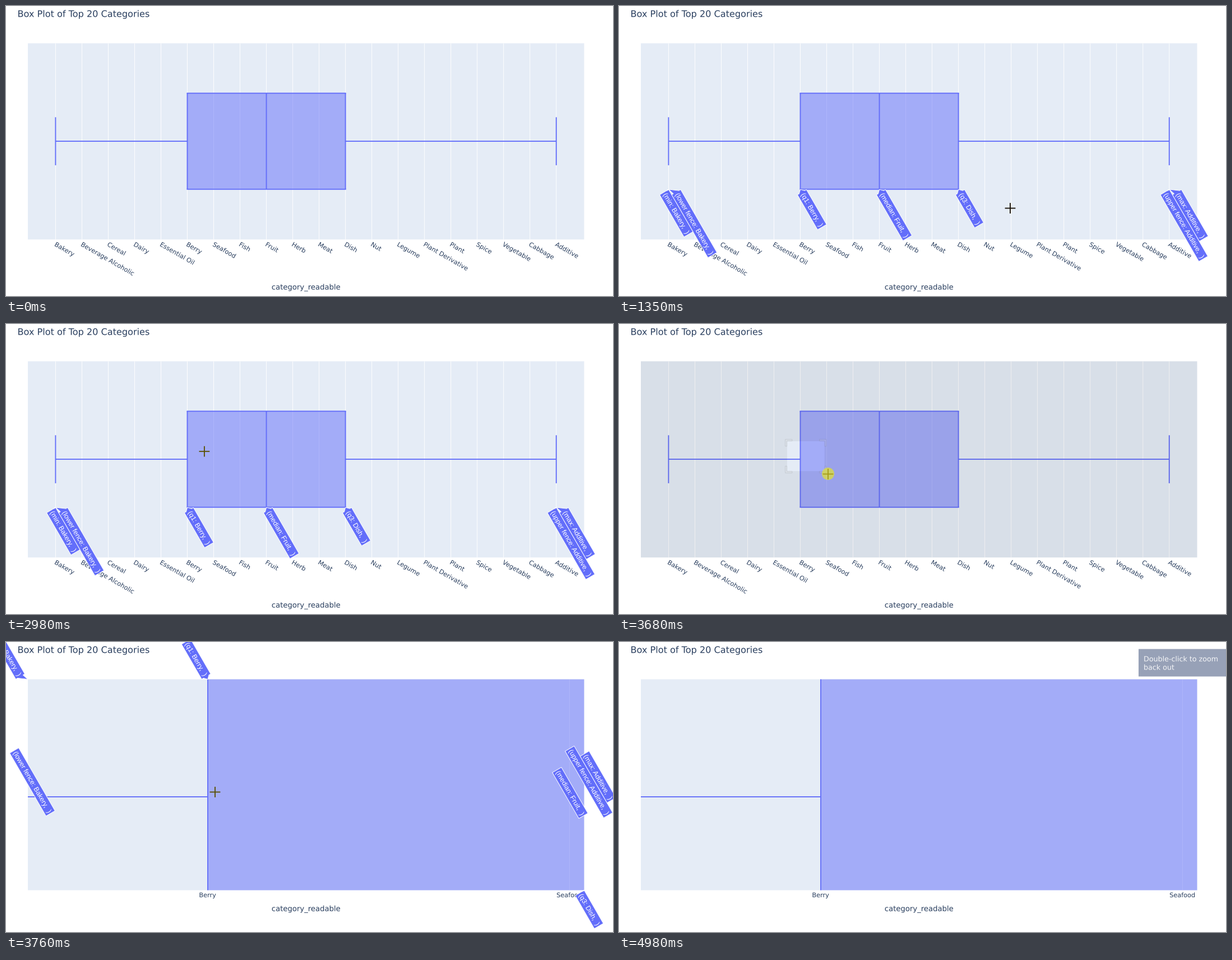
Write a matplotlib script that moves like this. It is 1083 px wide and 517 px high and loops after 5.21 s.

```python
from itertools import count

import numpy as np
import matplotlib.pyplot as plt
from matplotlib.animation import FuncAnimation
from matplotlib.patches import Circle, PathPatch, Polygon, Rectangle
from matplotlib.path import Path
from matplotlib.textpath import TextPath
from matplotlib.transforms import Affine2D

W, H = 1083, 517
LOOP, STEP = 5210, 10
INK, BLUE, PANEL = "#2a3f5f", "#636efa", "#e5ecf6"
LEFT, RIGHT, TOP = 39, 1031.5, 66.5
BOTTOM, ZOOM_BOTTOM = 416.2, 442.5
GRID0, GAP = 88.4, 47.02
PRESS, SHADE, RELEASE, ZOOM = 3370, 3605, 3730, 3760

CATEGORIES = ["Bakery", "Beverage Alcoholic", "Cereal", "Dairy",
              "Essential Oil", "Berry", "Seafood", "Fish", "Fruit", "Herb",
              "Meat", "Dish", "Nut", "Legume", "Plant Derivative", "Plant",
              "Spice", "Vegetable", "Cabbage", "Additive"]

plt.rcParams["path.snap"] = False
# At 72 dpi one point equals one pixel.
fig = plt.figure(figsize=(W / 72, H / 72), dpi=72, facecolor="white")
ax = fig.add_axes([0, 0, 1, 1])
ax.set_xlim(0, W)
ax.set_ylim(H, 0)
ax.axis("off")
layer = count(1)


def put(artist):
    artist.set_zorder(next(layer))
    ax.add_artist(artist)
    return artist


def rect(x0, y0, x1, y1, color, **kw):
    return put(Rectangle((x0, y0), x1 - x0, y1 - y0, fc=color, lw=0, **kw))


def lines(segments, color, width):
    pts = [p for a, b in segments for p in (a, b, (np.nan, np.nan))]
    x, y = zip(*pts)
    return put(plt.Line2D(x, y, color=color, lw=width,
                          solid_capstyle="butt"))


def glyphs(s, size, font="DejaVu Sans"):
    return TextPath((0, 0), s, size=size, prop=font)


def write(path, x, y, color=INK, turn=0, centre=False):
    """Place glyphs with the baseline at (x, y), turned clockwise."""
    box = path.get_extents()
    move = Affine2D().translate(-(box.x0 + box.x1) / 2 if centre else 0, 0)
    move.scale(1, -1).rotate_deg(turn).translate(x, y)
    return put(PathPatch(move.transform_path(path), fc=color, lw=0))


def text(x, y, s, size, color=INK, **kw):
    return write(glyphs(s, size), x, y, color, **kw)


def slot(i):
    return GRID0 + GAP * i


def compound(polygons):
    return Path.make_compound_path(
        *[Path(list(p) + [p[0]], closed=True) for p in polygons])


def box_points(x0, y0, x1, y1):
    return [(x0, y0), (x1, y0), (x1, y1), (x0, y1)]


def wide_plot():
    q1, med, q3 = slot(5), slot(8), slot(11)
    lo, hi = slot(0), slot(19)
    top, mid, low = 155.5, 241.1, 326.7
    art = [rect(LEFT, TOP, RIGHT, BOTTOM, PANEL),
           lines([((slot(i), TOP), (slot(i), BOTTOM)) for i in range(20)],
                 "white", 0.94),
           rect(q1, top, q3, low, BLUE, alpha=0.5),
           lines([((q1 - 0.9, top), (q3 + 0.9, top)),
                  ((q1 - 0.9, low), (q3 + 0.9, low)),
                  ((q1, top), (q1, low)), ((q3, top), (q3, low)),
                  ((med, top), (med, low)),
                  ((lo, mid), (q1, mid)), ((q3, mid), (hi, mid)),
                  ((lo, 198.3), (lo, 283.9)), ((hi, 198.3), (hi, 283.9))],
                 BLUE, 1.88),
           text(535.3, 505.5, "category_readable", 13.2, centre=True)]
    art += [text(slot(i) - 2.8, 427.2, name, 11.28, turn=30)
            for i, name in enumerate(CATEGORIES)]
    return art


def zoomed_plot():
    return [rect(LEFT, TOP, RIGHT, ZOOM_BOTTOM, PANEL),
            lines([((1005.3, TOP), (1005.3, ZOOM_BOTTOM))], "white", 0.94),
            rect(360, TOP, RIGHT, ZOOM_BOTTOM, BLUE, alpha=0.5),
            lines([((360, TOP), (360, ZOOM_BOTTOM)),
                   ((LEFT, 276), (360, 276))], BLUE, 1.88),
            text(360, 455, "Berry", 11.28, centre=True),
            text(1005, 455, "Seafood", 11.28, centre=True),
            text(535.3, 479.8, "category_readable", 13.2, centre=True)]


ALONG = np.array([0.5, 0.866])
ACROSS = np.array([-0.866, 0.5])


def hover(label, x, y, shift=0, side=1):
    """Tilted label; side 1 hangs below the point, -1 above, 0 is centred."""
    path = glyphs(f"({label},  )", 12.2, "Liberation Sans")
    full, half, tip = path.get_extents().width + 6.6, 9.3, 5.64
    if side:
        s, k = shift * 0.5, -shift * 0.866
        a, b = side * tip + s, side * (tip + full) + s
        shape = [(0, 0), (a, k + tip), (a, k + half), (b, k + half),
                 (b, k - half), (a, k - half), (a, k - tip)]
        start = min(a, b)
    else:
        k, start = 0, -full / 2
        shape = box_points(start, -half, -start, half)
    origin = np.array([x, y])
    patch = put(Polygon([origin + p * ALONG + q * ACROSS for p, q in shape],
                        fc=BLUE, ec="white", lw=0.94, joinstyle="miter"))
    base = origin + (start + 2.8) * ALONG + (k + 4.2) * ACROSS
    return [patch, write(path, *base, "white", turn=60)]


def show(artists, on):
    for a in artists:
        a.set_visible(on)


wide = wide_plot()
zoomed = zoomed_plot()
title = text(20.5, 19.5, "Box Plot of Top 20 Categories", 16.1)

D = 10.7
wide_hover = (hover("lower fence: Bakery", slot(0), 327, D)
              + hover("min: Bakery", slot(0), 327, -D)
              + hover("q1: Berry", slot(5), 327)
              + hover("median: Fruit", slot(8), 327)
              + hover("q3: Dish", slot(11), 327)
              + hover("max: Additive", slot(19), 327, D)
              + hover("upper fence: Additive", slot(19), 327, -D))
zoom_hover = (hover("min: Bakery", LEFT, TOP, -D, -1)
              + hover("lower fence: Bakery", 47, 249.5, side=0)
              + hover("q1: Berry", 360, TOP, 0, -1)
              + hover("median: Fruit", 1006.5, 269, side=0)
              + hover("max: Additive", 1056.3, 240.6, side=0)
              + hover("upper fence: Additive", 1040, 249.5, side=0)
              + hover("q3: Dish", RIGHT, ZOOM_BOTTOM, -D))

notice = [rect(927, 12.5, W, 61.5, "#8c97af"),
          text(936, 34.5, "Double-click to zoom", 12.67, "white"),
          text(936, 49.5, "back out", 12.67, "white")]

blank = Path([(0, 0), (0, 0)])
shade = put(PathPatch(blank, fc="black", lw=0))
corners = put(PathPatch(blank, fc="#eeeeee", ec="#444444", lw=0.94))
halo = put(Circle((0, 0), 11, fc="#f4f400", alpha=0.56, lw=0))
cross = lines([((0, 0), (1, 1))], "black", 1.9)
ARROW = np.array([(0, 0), (0, 15.5), (3.6, 12.2), (6, 17.2), (8.2, 16.2),
                  (5.9, 11.3), (10.8, 11.3)])
arrow = put(Polygon(ARROW, fc="white", ec="black", lw=0.9))

# start ms, end ms, from, to
MOVES = [(410, 920, (987, 513), (863, 423)),
         (950, 1350, (858, 412), (698, 360.5)),
         (1620, 2140, (698, 360.5), (449, 271)),
         (2160, 2500, (449, 271), (393.5, 240)),
         (2820, 3180, (393.5, 240), (301, 210)),
         (3530, 3680, (301, 210), (373, 267.5)),
         (4000, 4240, (373, 267.5), (683, 304)),
         (4520, 4600, (683, 304), (1063, 495)),
         (4860, 4980, (1063, 495), (1087, 521))]


def glide(u):
    return 0.4 * u + 0.6 * u * u * (3 - 2 * u)


def cubic(u):
    u = min(max(u, 0), 1)
    return 4 * u ** 3 if u < 0.5 else 1 - 4 * (1 - u) ** 3


def cursor(t):
    pos = None
    for t0, t1, a, b in MOVES:
        if t >= t0:
            u = glide(min((t - t0) / (t1 - t0), 1))
            pos = np.array(a) + u * (np.array(b) - np.array(a))
    return pos


def draw_selection(t):
    on = SHADE <= t < ZOOM
    show([shade, corners], on)
    if not on:
        return
    x0, y0 = 300, 209
    x1, y1 = cursor(t - 20) - (0.5, 0.5)
    fade = cubic((t - SHADE) / 230)
    hole = box_points(x0, y0, x1, y1)[::-1]
    shade.set_path(compound([box_points(LEFT, TOP, RIGHT, BOTTOM), hole]))
    shade.set_alpha(0.4 * fade)
    c = min(9.4, (x1 - x0) / 2, (y1 - y0) / 2)
    marks = []
    for sx, x in ((-1, x0), (1, x1)):
        for sy, y in ((-1, y0), (1, y1)):
            xi, xo = x + sx * 0.5, x + sx * 3.3
            yi, yo = y + sy * 0.5, y + sy * 3.3
            marks.append([(xo, yi - sy * c), (xi, yi - sy * c), (xi, yi),
                          (xi - sx * c, yi), (xi - sx * c, yo), (xo, yo)])
    corners.set_path(compound(marks))
    corners.set_alpha(fade)


def cross_color(t, x, y):
    if PRESS <= t < RELEASE:
        return "#a89e1a"
    if RELEASE <= t < ZOOM:
        return "#7d7a80"
    if t >= ZOOM:
        in_box = x > 360
    else:
        in_box = slot(5) < x < slot(11) and 155 < y < 327
    return "#5b5207" if in_box else "#1a1309"


def draw(i):
    t = i * STEP
    zoom = t >= ZOOM
    pos = cursor(t)
    inside = False
    if pos is not None:
        x, y = pos
        inside = (LEFT < x < RIGHT
                  and TOP < y < (ZOOM_BOTTOM if zoom else BOTTOM))
        if inside:
            cross.set_data([x - 9.4, x + 9.4, np.nan, x, x],
                           [y, y, np.nan, y - 9.4, y + 9.4])
            cross.set_color(cross_color(t, x, y))
            halo.center = (x, y - 0.5)
        else:
            arrow.set_xy(ARROW + pos)
    hovering = inside and not PRESS <= t < ZOOM
    show(wide, not zoom)
    show(zoomed, zoom)
    show(wide_hover, hovering and not zoom)
    show(zoom_hover, hovering and zoom)
    show([cross], inside)
    show([arrow], pos is not None and not inside)
    show([halo], PRESS <= t < RELEASE)
    draw_selection(t)

    show(notice, t >= 4000)
    clock = 4240 if 4240 <= t < 4520 else t
    for part in notice:
        part.set_alpha(0.9 * cubic((clock - 3723) / 700))
    return []


anim = FuncAnimation(fig, draw, frames=LOOP // STEP, interval=STEP,
                     repeat=True, repeat_delay=0, cache_frame_data=False)
plt.show()
```
